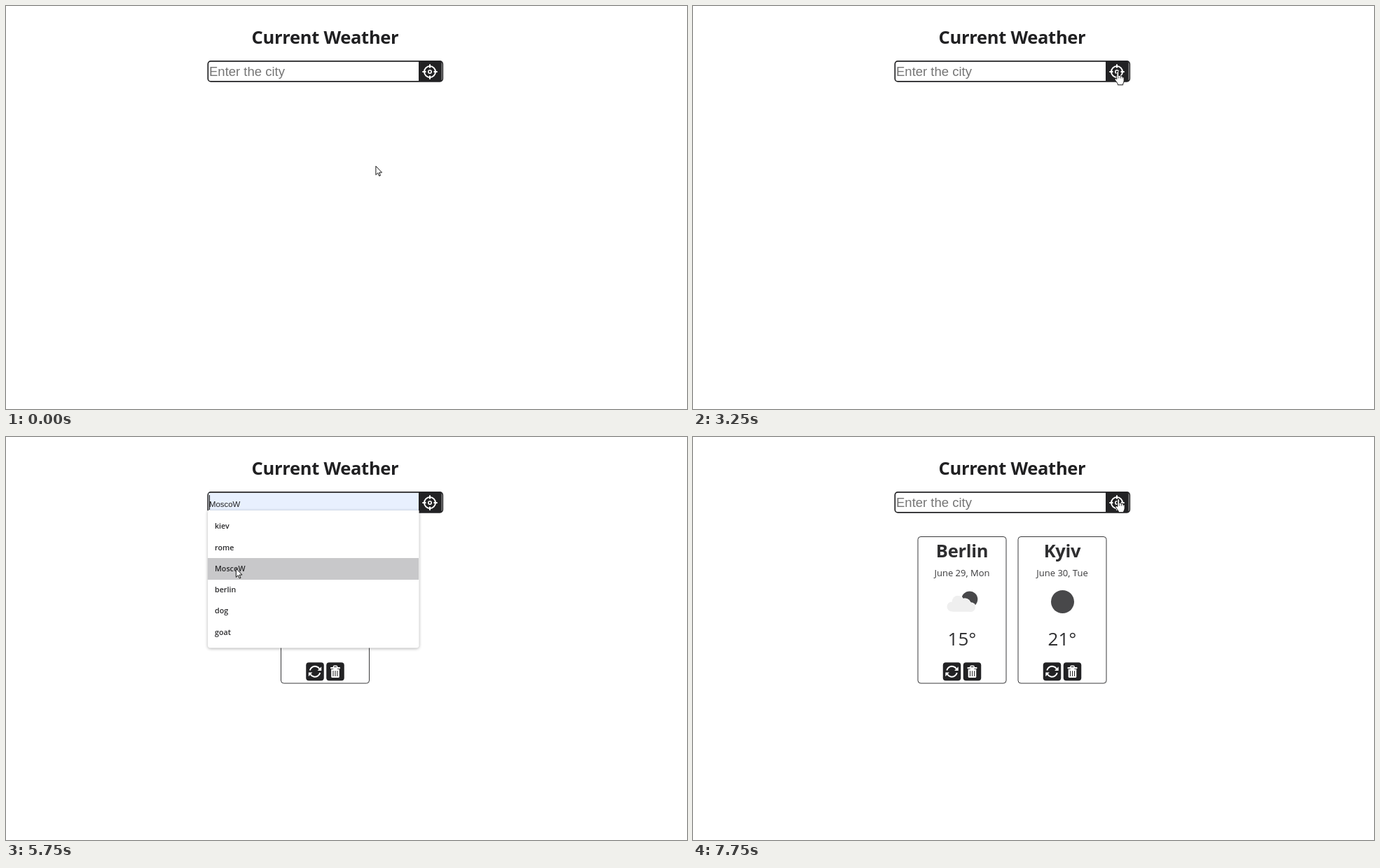
An HTML page with a canvas that plays this animation: 972 px wide and 576 px high, repeating every 8000 ms.

```html
<!DOCTYPE html>
<html lang="en">
<head>
<meta charset="utf-8">
<title>Current Weather</title>
<style>
html, body { margin: 0; width: 100%; height: 100%; overflow: hidden; background: #fff; }
canvas { display: block; }
</style>
</head>
<body>
<canvas id="stage" width="972" height="576"></canvas>
<script>
const ctx = document.getElementById('stage').getContext('2d');
const LOOP = 8000;
const DARK = '#222224';
const UI = '"Open Sans", "Noto Sans", sans-serif';
const FIELD = '"Liberation Sans", Arial, sans-serif';
const CITIES = ['kiev', 'rome', 'MoscoW', 'berlin', 'dog', 'goat'];
const KYIV = { name: 'Kyiv', date: 'June 30, Tue', temp: '21°', cloudy: false };
const BERLIN = { name: 'Berlin', date: 'June 29, Mon', temp: '15°', cloudy: true };

// start time, pointer shape, pointer x, pointer y
const POINTER = [
  [0, arrow, 527.5, 228.5], [250, arrow, 455, 160], [500, beam, 396, 95],
  [1250, arrow, 384, 107], [1500, arrow, 362, 120],
  [2250, arrow, 410, 126], [2500, arrow, 488, 126], [2750, arrow, 568, 115],
  [3000, hand, 604, 94], [3250, hand, 606.5, 94],
  [4500, arrow, 592, 114], [4750, beam, 508, 97], [5000, beam, 428, 96],
  [5250, arrow, 411, 113], [5500, arrow, 366, 152], [5750, arrow, 328, 187.5],
  [6000, arrow, 336, 209], [6250, arrow, 340, 212], [6500, arrow, 373, 184],
  [6750, arrow, 583, 118], [7000, arrow, 607, 26], [7250, hand, 606.5, 92],
  [7500, hand, 607.5, 89]
];

// start time, menu open, highlighted row, typed city
const FORM = [
  [0, false, -1, ''], [1000, true, -1, ''], [1500, true, 0, ''], [2000, false, -1, 'kiev'],
  [3250, false, -1, ''], [5000, true, -1, ''], [5500, true, 1, ''], [5750, true, 2, ''],
  [6000, true, 3, ''], [6500, false, -1, 'berlin'], [7500, false, -1, '']
];

const CARDS = [[0, []], [3500, [KYIV]], [7750, [BERLIN, KYIV]]];

const at = (keys, t) => keys.filter(k => k[0] <= t).pop();

function text(str, x, y, font, color, align = 'left', spacing = 0) {
  ctx.font = font;
  ctx.fillStyle = color;
  ctx.textAlign = align;
  ctx.letterSpacing = spacing + 'px';
  ctx.fillText(str, x, y);
}

function box(x, y, w, h, r, fill, stroke, line = 1) {
  ctx.beginPath();
  ctx.roundRect(x, y, w, h, r);
  if (fill) { ctx.fillStyle = fill; ctx.fill(); }
  if (stroke) { ctx.strokeStyle = stroke; ctx.lineWidth = line; ctx.stroke(); }
}

function disc(x, y, r, fill) {
  ctx.beginPath();
  ctx.arc(x, y, r, 0, 7);
  ctx.fillStyle = fill;
  ctx.fill();
}

function ring(x, y, r, line, from = 0, to = Math.PI * 2) {
  ctx.beginPath();
  ctx.arc(x, y, r, from, to);
  ctx.lineWidth = line;
  ctx.strokeStyle = '#fff';
  ctx.stroke();
}

function placed(x, y, draw) {
  ctx.save();
  ctx.translate(x, y);
  draw();
  ctx.restore();
}

function shape(path, line) {
  const p = new Path2D(path);
  ctx.fillStyle = '#fff';
  ctx.strokeStyle = '#111';
  ctx.lineWidth = line;
  ctx.lineJoin = 'round';
  ctx.fill(p);
  ctx.stroke(p);
}

function arrow() {
  ctx.scale(.78, .78);
  shape('M.5 .5V16.5L4.2 13L6.7 18.6L9 17.6L6.6 12.2H11.6Z', 1.25);
}

function beam() {
  ctx.fillStyle = '#111';
  ctx.fillRect(-.5, -7, 1, 14);
  for (const y of [-8, 7]) {
    ctx.fillRect(-3.5, y, 3, 1);
    ctx.fillRect(.5, y, 3, 1);
  }
}

function hand() {
  shape('M-1.6 10.5V1Q-1.6 -.5 -.2 -.5Q1.3 -.5 1.3 1V6Q1.5 5 2.7 5.1Q4 5.2 4 6.6Q4.4 5.7 5.4 5.9Q6.6 6.1 6.6 7.4Q8.6 6.5 8.7 9V13Q8.5 15.5 7.2 17.2V18.8H-.2V17.2L-4.2 11.6Q-5 9.6 -3.6 9.4Q-2.6 9.4 -1.6 10.5Z', 1);
  ctx.beginPath();
  for (const x of [1.3, 4, 6.6]) {
    ctx.moveTo(x, 6.5);
    ctx.lineTo(x, 9.5);
  }
  ctx.lineWidth = .7;
  ctx.stroke();
}

function target() {
  ring(0, 0, 8, 2);
  ring(0, 0, 2.2, 1.6);
  ctx.fillStyle = '#fff';
  for (let i = 0; i < 4; i++) {
    ctx.fillRect(5.5, -1, 5.2, 2);
    ctx.rotate(Math.PI / 2);
  }
}

function refresh() {
  box(-12.75, -13, 25.5, 26, 4, DARK);
  for (let i = 0; i < 2; i++) {
    ring(0, 0, 7.5, 2, -2.9, -.55);
    ctx.fillStyle = '#fff';
    ctx.fill(new Path2D('M9.2 -7V-1.2H3.6Z'));
    ctx.rotate(Math.PI);
  }
}

function trash() {
  box(-12.75, -13, 25.5, 26, 4, DARK);
  box(-2.6, -8, 5.2, 4, 1, null, '#fff', 1.4);
  box(-7, -6.2, 14, 2.2, .8, '#fff');
  box(-5.8, -3.2, 11.6, 12, [0, 0, 1.5, 1.5], '#fff');
  for (const x of [-3, 0, 3]) box(x - .5, -1.2, 1, 8, .5, DARK);
}

function cloud() {
  disc(10.8, -3.5, 11.5, '#48484a');
  const puffs = [[-14.5, 7, 7], [-6, -.5, 8.2], [4, 3.5, 8], [12.5, 8, 6.5]];
  const layer = (grow, color) => {
    for (const [x, y, r] of puffs) disc(x, y, r + grow, color);
    box(-15, 4 - grow, 28, 10.3 + grow, 3, color);
  };
  layer(.8, '#fff');
  layer(0, '#efefef');
}

function card(x, { name, date, temp, cloudy }) {
  const mid = x + 63;
  box(x, 142.5, 126, 209.5, 4, '#fff', '#3a3a3c');
  text(name, mid, 172, `700 25.5px ${UI}`, '#2e2e30', 'center', -.3);
  text(date, mid, 198.5, `13px ${UI}`, '#39393b', 'center');
  if (cloudy) placed(mid, 235.5, cloud);
  else disc(mid + .5, 235.5, 16.5, '#48484a');
  text(temp, mid, 297.5, `26px ${UI}`, '#2e2e30', 'center');
  placed(x + 48.5, 335.3, refresh);
  placed(x + 77.5, 335.3, trash);
}

function squiggle(from, to) {
  ctx.beginPath();
  for (let x = from; x <= to; x += 1.5) {
    ctx.lineTo(x, 102 + (Math.round((x - from) / 1.5) % 2 ? .9 : -.9));
  }
  ctx.strokeStyle = '#e5484d';
  ctx.lineWidth = .9;
  ctx.stroke();
}

function field(t, [since, open, row, typed]) {
  const preview = row >= 0 ? CITIES[row] : '';
  box(288.3, 78.9, 335, 29, 4, '#fff', DARK, 1.7);
  if (typed || preview) {
    ctx.fillStyle = '#e8f0fe';
    ctx.fillRect(289.5, 80, 299.5, 27);
  }
  ctx.fillStyle = DARK;
  ctx.fillRect(589, 79, 32.8, 29);
  placed(605, 94, target);

  let caret = 290.5;
  if (preview) {
    text(preview, 290, 99.5, `11.4px ${FIELD}`, '#222');
  } else if (typed) {
    text(typed, 290, 100, `18.5px ${FIELD}`, '#111');
    caret = 290 + ctx.measureText(typed).width;
    squiggle(290.5, caret - .5);
  } else {
    text('Enter the city', 290, 100, `18.5px ${FIELD}`, '#757575');
  }
  const lit = open || (typed && (t - since) % 1000 < 500);
  if (lit) {
    ctx.fillStyle = '#111';
    ctx.fillRect(Math.floor(caret), 83, 1, 21);
  }
}

function menu(row) {
  ctx.save();
  ctx.shadowColor = 'rgba(0,0,0,.32)';
  ctx.shadowBlur = 4;
  ctx.shadowOffsetY = 1;
  box(288, 105, 301.5, 196.5, [0, 0, 4, 4], '#fff');
  ctx.restore();
  CITIES.forEach((city, i) => {
    const y = 112.2 + i * 30.3;
    if (i === row) {
      ctx.fillStyle = '#c8c8ca';
      ctx.fillRect(288, Math.round(y), 301, 31);
    }
    text(city, 298, y + 19, `600 10.7px ${UI}`, '#2a2a2c');
  });
}

function draw(t) {
  ctx.fillStyle = '#fff';
  ctx.fillRect(0, 0, 972, 576);
  text('Current Weather', 455.5, 53.5, `700 25.5px ${UI}`, '#202022', 'center', -.3);
  const cards = at(CARDS, t)[1];
  const left = 392.5 - (cards.length - 1) * 71.5;
  cards.forEach((c, i) => card(left + i * 143, c));
  const form = at(FORM, t);
  field(t, form);
  if (form[1]) menu(form[2]);
  const [, pointer, x, y] = at(POINTER, t);
  placed(x, y, pointer);
}

const start = performance.now();
function tick() {
  draw((performance.now() - start) % LOOP);
  requestAnimationFrame(tick);
}
tick();
</script>
</body>
</html>
```
